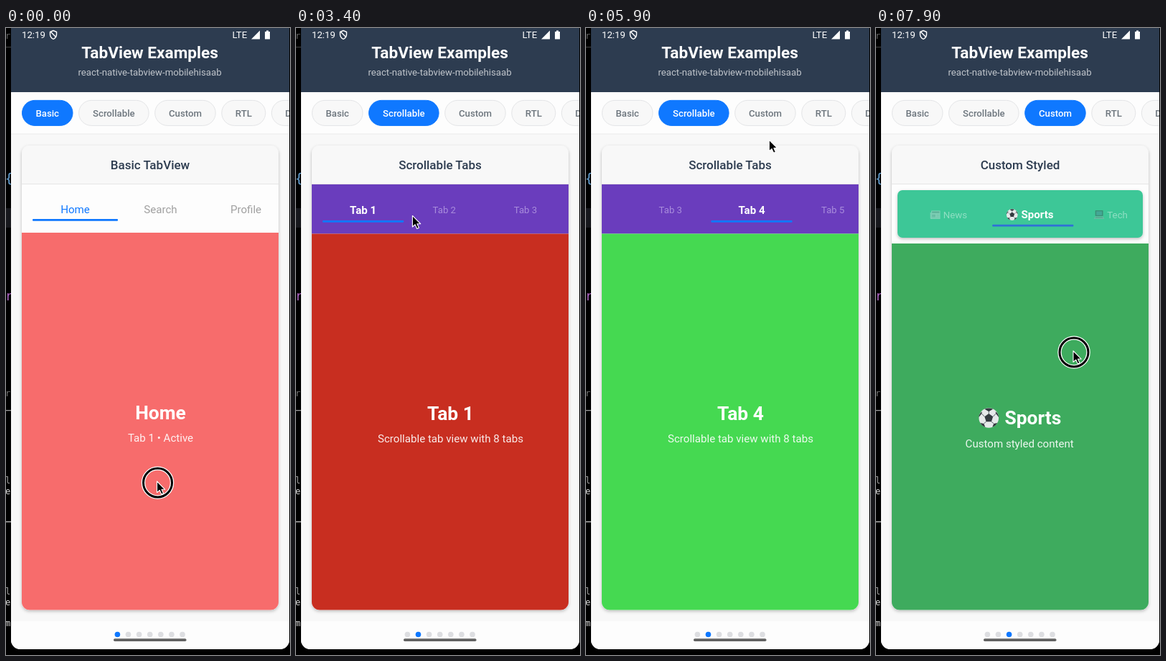
Write an HTML page that moves like this. It is 396x870 px and loops after 8000 ms.

```html
<!DOCTYPE html>
<html lang="en">
<head>
<meta charset="utf-8">
<title>TabView Examples</title>
<style>
html, body { margin: 0; width: 100%; height: 100%; overflow: hidden; background: #000; }
svg { display: block; width: 396px; height: 870px; font-family: Roboto, sans-serif; }
.mono { font-family: "DejaVu Sans Mono", monospace; }
</style>
</head>
<body>
<svg viewBox="0 0 396 870">
  <defs>
    <clipPath id="phone"><path d="M7 0H395V849a13 13 0 0 1-13 13H20a13 13 0 0 1-13-13Z"/></clipPath>
    <clipPath id="card"><rect x="22" y="163" width="358" height="644.5" rx="11"/></clipPath>
    <clipPath id="edge"><rect width="7" height="870"/></clipPath>
    <clipPath id="tabs"><rect x="37" y="217" width="328" height="82"/></clipPath>
    <filter id="shadow" x="-10%" y="-10%" width="120%" height="120%">
      <feDropShadow dx="0" dy="1.8" stdDeviation="2" flood-opacity=".25"/>
    </filter>
    <symbol id="news" viewBox="0 0 30 30">
      <path d="M4 4H29V27H3Q1 27 1 24V9H4Z" fill="#dfe4e7"/>
      <path d="M4 9V24" stroke="#a3afb5"/>
      <path d="M6 8H27" stroke="#66747c" stroke-width="3"/>
      <path d="M6 12H27M18 15h9M18 18h9M18 21h9M6 24.500H27" stroke="#a0abb1"/>
      <rect x="6" y="14.500" width="10" height="7.500" fill="#a5b1b8"/>
    </symbol>
    <symbol id="ball" viewBox="0 0 30 30">
      <circle cx="15" cy="15" r="14" fill="#e6e9ea"/>
      <path d="M15 9l6 4.300-2.300 7h-7.400L9 13.300Z M9 2.500Q15 0 21 2.500L15 6Z M1 14l4-5 .5-3Q1 9 1 14Z M29 14l-4-5-.5-3Q29 9 29 14Z M3 22l5 1 2 5Q5 26 3 22Z M27 22l-5 1-2 5Q25 26 27 22Z" fill="#343b40"/>
      <path d="M15 6v3M5 9l4 4.300M25 9l-4 4.300M8 23l3.300-2.700M22 23l-3.300-2.700" stroke="#59636a"/>
    </symbol>
    <symbol id="laptop" viewBox="0 0 30 30">
      <rect x="4" y="3" width="22" height="16" rx="1.500" fill="#37444b"/>
      <rect x="7" y="5.500" width="16" height="11" fill="#4c7f94"/>
      <path d="M4 20H26L30 27H0Z" fill="#a3afb5"/>
      <path d="M5 22H25M4 24H26" stroke="#56646c"/>
    </symbol>
  </defs>
  <g clip-path="url(#edge)" class="mono" id="editor"></g>
  <g clip-path="url(#phone)" id="screen"></g>
  <g id="pointer"></g>
</svg>
<script>
const LOOP = 8000, STEP = 100, PAGE = 388, SWIPE = 600, PRESS = 300;
const BLUE = '#0f78ff', NAVY = '#2d3c50';
const $ = id => document.getElementById(id);
const unit = v => Math.min(1, Math.max(0, v));
const smooth = v => { const u = unit(v); return u * u * (3 - 2 * u); };
const outBack = v => { const u = unit(v) - 1; return 1 + 2 * u ** 3 + u ** 2; };

const rect = (x, y, w, h, fill, extra = '') =>
  `<rect x="${x}" y="${y}" width="${w}" height="${h}" fill="${fill}" ${extra}/>`;

// Text placed by the middle of its capitals.
const text = (s, x, y, size, fill, weight = 400, anchor = 'middle', extra = '') =>
  `<text x="${x}" y="${y + size * .355}" font-size="${size}" fill="${fill}" font-weight="${weight}" text-anchor="${anchor}" ${extra}>${s}</text>`;

// Each swipe time moves the pager one page on.
const sections = [
  { start: 0, title: 'Basic TabView', tabs: ['Home', 'Search', 'Profile'], tabWidth: 119, left: 37, top: 284, lineY: 265,
    color: i => ['#f76c6c', '#5ccbc1', '#45b7d1'][i], sub: i => `Tab ${i + 1} • Active`, swipes: [100] },
  { start: 2800, title: 'Scrollable Tabs', tabs: Array.from({ length: 8 }, (_, i) => `Tab ${i + 1}`),
    tabWidth: 113.2, left: 37, top: 285.5, lineY: 267,
    color: i => `hsl(${5 + 40 * i} ${72 - 2 * i}% ${45.5 + 3.5 * i}%)`, sub: () => 'Scrollable tab view with 8 tabs',
    swipes: [3500, 4085, 4700] },
  { start: 6200, title: 'Custom Styled', tabs: ['News', 'Sports', 'Tech'], tabWidth: 113.2, left: 44.5, top: 299, lineY: 272.8,
    icons: ['news', 'ball', 'laptop'], widths: [3.91, 4.37, 3.58],
    color: i => [NAVY, '#3eab5e', '#8e44ad'][i], sub: () => 'Custom styled content', swipes: [6900, 7894] },
];
for (const s of sections) {
  s.labelY = (s.top + 217) / 2 + 1;
  s.titleY = s.top / 2 + 391.5;
}

const position = (s, t) => s.swipes.reduce((sum, at) => sum + outBack((t - at) / SWIPE), 0);

// After a swipe settles, the tab bar centres the new tab.
function tabScroll(s, t) {
  const centred = i => Math.max(0, (i + .5) * s.tabWidth - PAGE / 2);
  return s.swipes.reduce((sum, at, i) => sum + (centred(i + 1) - centred(i)) * smooth((t - at - SWIPE) / 300), 0);
}

function iconLabel(s, i, center, y, size, opacity = 1) {
  const x = center - s.widths[i] * size / 2, icon = size * 1.12;
  return `<g opacity="${opacity}"><use href="#${s.icons[i]}" x="${x}" y="${y - icon / 2}" width="${icon}" height="${icon}"/>`
    + text(s.tabs[i], x + size * 1.4, y, size, '#fff', opacity < 1 ? 400 : 700, 'start') + '</g>';
}

function tabBar(s, index, pos, t) {
  const active = Math.round(pos);
  let out = rect(22, 217, 358, s.top - 217, index === 1 ? '#6a3dbd' : '#fdfdfd');
  if (s.icons) out += rect(30, 225, 342, 66, '#3cc797', 'rx="7" filter="url(#shadow)"');
  out += `<g clip-path="url(#tabs)"><g transform="translate(${s.left - tabScroll(s, t)})">`;
  s.tabs.forEach((name, i) => {
    const x = (i + .5) * s.tabWidth, on = i === active;
    if (s.icons) out += iconLabel(s, i, x, s.labelY, on ? 15.1 : 13.3, on ? 1 : .42);
    else if (index) out += text(name, x, s.labelY, on ? 15.1 : 13.2, on ? '#fff' : '#a88cdc', on ? 700 : 400);
    else out += text(name, x, s.labelY, 15.1, on ? BLUE : '#a0a0a0');
  });
  return out + rect(pos * s.tabWidth, s.lineY, s.tabWidth, 2.8, s.icons ? '#2f70d8' : BLUE, 'rx="1"') + '</g></g>';
}

function pages(s, pos) {
  return s.tabs.map((name, i) => {
    if (Math.abs(i - pos) >= 1) return '';
    const x = 22 + (i - pos) * PAGE, center = x + 193.5;
    return rect(x, s.top, PAGE + .5, 808 - s.top, s.color(i))
      + (s.icons ? iconLabel(s, i, center, s.titleY, 26.4) : text(name, center, s.titleY, 26.4, '#fff', 700))
      + text(s.sub(i), center, s.titleY + 35.5, 15.1, '#fff', 400, 'middle', 'opacity=".9"');
  }).join('');
}

function pills(index) {
  let x = 22;
  return Object.entries({ Basic: 71.5, Scrollable: 98.5, Custom: 85.5, RTL: 62, Dynamic: 90 }).map(([name, w], i) => {
    const on = i === index;
    const out = rect(x + .5, 100.4, w - 1, 35, on ? BLUE : '#f8f8f8', `rx="17.5" stroke="${on ? BLUE : '#e4e5e7'}"`)
      + text(name, x + w / 2, 118.5, 13.2, on ? '#fff' : '#6c757d', 500);
    x += w + 7.6;
    return out;
  }).join('');
}

const statusBar = text('12:19', 22, 9.5, 13.2, '#fff', 400, 'start') + text('LTE', 315.5, 9.5, 13.2, '#fff', 400, 'start')
  + `<path d="M61.500 5.500L66 3.500l4.500 2V9q0 4-4.500 6.500Q61.500 13 61.500 9ZM62 5l8 8" fill="none" stroke="#fff" stroke-width="1.4"/>
     <path d="M342 15.500H354V3.500ZM361 5h2V3.500h3V5h2v10.500h-7Z" fill="#fff"/>`;

function screen(t) {
  const index = sections.filter(s => s.start <= t).length - 1, s = sections[index], pos = position(s, t);
  let dots = '';
  for (let i = 0; i < 7; i++)
    dots += `<circle cx="${155.4 + i * 15.1}" cy="841.5" r="3.8" fill="${i === index ? BLUE : '#dddee1'}"/>`;
  return rect(7, 0, 388, 862, '#f8f8f8') + rect(7, 0, 388, 89, NAVY) + statusBar
    + text('TabView Examples', 200.5, 33.5, 22.6, '#fff', 700)
    + text('react-native-tabview-mobilehisaab', 200.5, 61.5, 13.2, '#c0c5cb')
    + rect(7, 89, 388, 58, '#fdfdfd') + rect(7, 146.5, 388, 1, '#ebebeb') + pills(index)
    + rect(22, 163, 358, 644.5, '#f8f8f8', 'rx="11" filter="url(#shadow)"')
    + '<g clip-path="url(#card)">' + text(s.title, 201, 190, 17, NAVY, 500)
    + rect(22, 216, 358, 1, '#e6e6e6') + tabBar(s, index, pos, t) + pages(s, pos) + '</g>'
    + rect(7, 823, 388, 39, '#fdfdfd') + dots + rect(150, 847.3, 101.5, 3.7, '#626262', 'rx="1.8"');
}

// Stops of the pointer as [time, x, y], and the times it presses.
const stops = [[0, 210.5, 629], [500, 192, 611], [1300, 192, 611], [2500, 143, 155], [2800, 150, 118],
  [4100, 178, 440], [5100, 310, 477], [6100, 249, 118], [6900, 227, 425], [LOOP - STEP, 275, 448]];
const presses = [0, 2700, 3500, 4200, 4700, 6100, 6900, 7800];

function pointer(t) {
  const i = Math.max(1, stops.findIndex(s => s[0] >= t)), [from, x0, y0] = stops[i - 1], [to, x1, y1] = stops[i];
  const u = smooth((t - from) / (to - from));
  const ring = (color, w) => `<circle cx="1" cy="2" r="20" fill="none" stroke="${color}" stroke-width="${w}"/>`;
  const pressed = presses.some(at => t >= at && t < at + PRESS);
  return `<g transform="translate(${x0 + (x1 - x0) * u} ${y0 + (y1 - y0) * u})">` + (pressed ? ring('#fff', 5.5) + ring('#000', 3) : '')
    + '<path d="M0 0V15.500L3.700 12.300 6.300 18 9 16.800 6.500 11.300H11.300Z" fill="#000" stroke="#fff" stroke-width="1.1" stroke-linejoin="round"/></g>';
}

// Sliver of the code editor behind the phone.
const glyph = (s, y, color, size = 12) => text(s, -1, y, size, color, 400, 'start');
$('editor').innerHTML = rect(0, 250, 7, 27, '#17181d') + rect(0, 26, 7, 1, '#444') + rect(0, 530, 7, 1.3, '#999') + rect(0, 684.5, 7, 1.3, '#ccc')
  + glyph('r', 11, '#666') + glyph('{', 209, '#6fb1e8', 17) + glyph('r', 372, '#b267c9', 17) + glyph('r', 507, '#777')
  + [628, 782].map(y => glyph('l', y, '#aaa') + glyph('e', y + 15, '#ddd')).join('') + glyph('m', 826, '#ddd');

let shown = -1;
function frame(now) {
  const t = Math.floor(now % LOOP / STEP) * STEP;
  if (t !== shown) {
    shown = t;
    $('screen').innerHTML = screen(t);
    $('pointer').innerHTML = pointer(t);
  }
  requestAnimationFrame(frame);
}
frame(0);
</script>
</body>
</html>
```
